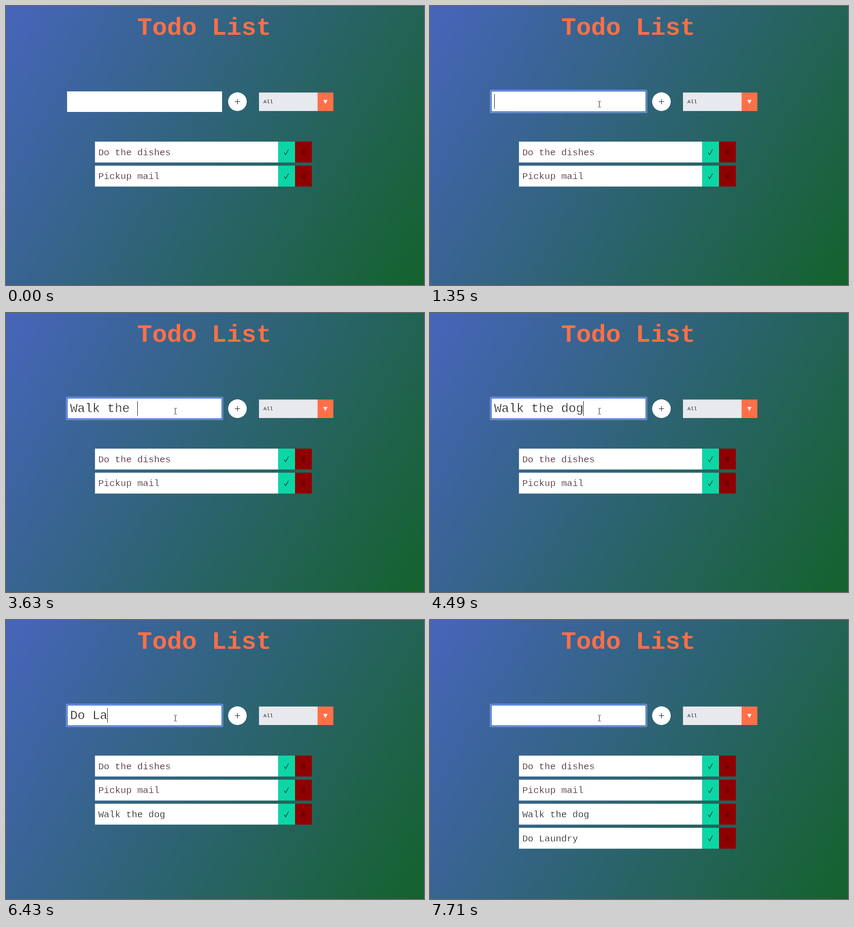
An HTML page for the animation above (8000 ms loop, 917 px wide and 611 px high).

```html
<!DOCTYPE html>
<html lang="en">
<head>
<meta charset="utf-8">
<title>Todo List</title>
<style>
  html, body { margin: 0; width: 100%; height: 100%; overflow: hidden; }
  body { background: linear-gradient(120deg, #4765bb, #14622c); }
  svg { display: block; width: 917px; height: 611px; }
  text { font-family: "Courier New", "Liberation Mono", monospace; fill: #1c1a1c; white-space: pre; }
  .title { font-size: 54.4px; font-weight: bold; fill: #ff6f47; }
  .typed { font-size: 27.2px; stroke: #fff; stroke-width: .6; }
  .item { font-size: 20.4px; stroke: #fff; stroke-width: .4; }
  .old { fill: #3e1a22; }
  .small { font-size: 11.6px; }
  .line { fill: none; stroke: #161616; }
</style>
</head>
<body>
<svg viewBox="0 0 917 611">
  <defs>
    <g id="row">
      <rect width="402" height="45.7" fill="#fff"/>
      <rect x="402" width="37" height="45.7" fill="#0cd6a6"/>
      <rect x="439" width="36.7" height="45.7" fill="#8f0000"/>
      <path class="line" stroke-width="1.1" d="M415.3 24l3 4.7 6.3-11.5"/>
      <path fill="none" stroke="#560004" d="M453 18.5h8M454.5 19v9h5.5v-9M456.3 20v7M458.2 20v7"/>
    </g>
  </defs>

  <text class="title" x="288.1" y="63">Todo List</text>

  <rect x="134" y="187" width="340" height="45" fill="#fff"/>
  <g id="ring">
    <rect x="132" y="184" width="344" height="50" rx="2" fill="#fff" opacity=".8"/>
    <rect x="133" y="185" width="342" height="48" rx="1" fill="#1a54d2"/>
    <rect x="135" y="187" width="338" height="44" fill="#fff"/>
  </g>
  <text id="typed" class="typed" x="140.8" y="217"></text>
  <rect id="caret" y="193" width="1" height="32" fill="#111"/>

  <circle cx="507.7" cy="209.5" r="20.4" fill="#fff"/>
  <path class="line" stroke-width="1.1" d="M502 209.5h11.5M507.7 203.8v11.5"/>

  <rect x="555" y="189.5" width="129" height="40.5" fill="#e7e9ed"/>
  <rect x="683.5" y="189.5" width="34.7" height="40.5" fill="#ff7048"/>
  <path d="M696 205.8h9.4l-4.7 8.8z" fill="#fff"/>
  <text class="small" x="564.8" y="213">All</text>

  <g id="list"></g>

  <path id="arrow" d="M0 0v16l3.7-3.5 2.5 5.8 2.6-1.1-2.5-5.7h5.2z" fill="#fff" stroke="#111"/>
  <path id="beam" class="line" d="M-3-6.5H-1L0-5.5 1-6.5H3M0-6V6M-3 6.5H-1L0 5.5 1 6.5H3"/>
</svg>
<script>
const LOOP = 8000, FOCUS = 1290, BLINK = 520, PITCH = 16.3;
const $ = id => document.getElementById(id);

const items = [
  { label: "Do the dishes", time: 0 },
  { label: "Pickup mail", time: 0 },
  { label: "Walk the dog", time: 4750 },
  { label: "Do Laundry", time: 7510 }
];

// each burst is typed at an even pace (ms per key)
const bursts = [
  { text: "Walk", start: 2340, pace: 190 },
  { text: " the ", start: 3160, pace: 117 },
  { text: "dog", start: 3890, pace: 265 },
  { text: "Do ", start: 5500, pace: 200 },
  { text: "L", start: 6100, pace: 200 },
  { text: "aundry", start: 6430, pace: 150 }
];

const rows = items.map(({ label, time }, i) => {
  const g = document.createElementNS("http://www.w3.org/2000/svg", "g");
  g.setAttribute("transform", `translate(195.2 ${297 + i * 52.7})`);
  g.innerHTML = `<use href="#row"/><text class="item${time ? "" : " old"}" x="7.2" y="29.5">${label}</text>`;
  $("list").append(g);
  return { g, time };
});

const show = (el, on) => el.style.display = on ? "" : "none";
const clamp = v => Math.max(0, Math.min(1, v));
const easeOut = v => 1 - (1 - v) ** 3;

function typing(t) {
  const cleared = Math.max(...items.map(i => i.time).filter(time => time <= t));
  let text = "", lastKey = FOCUS;
  for (const b of bursts.filter(b => b.start <= t)) {
    const n = Math.min(b.text.length, Math.floor((t - b.start) / b.pace) + 1);
    lastKey = b.start + (n - 1) * b.pace;
    if (b.start >= cleared) text += b.text.slice(0, n);
  }
  return { text, lastKey };
}

// a fast sweep into the input, then a small curved drift; moves in 68 ms ticks
function pointer(t) {
  const now = 470 + Math.floor((t - 470) / 68) * 68;
  const sweep = easeOut(clamp((now - 470) / 480));
  const drift = clamp((now - 950) / 260);
  const bow = Math.sin(Math.PI * drift);
  return {
    x: Math.round(727 - 361 * sweep + 5 * drift - 6 * bow),
    y: Math.round(540 - 317 * sweep - 8 * drift - 6 * bow)
  };
}

function place(el, on, x, y) {
  show(el, on);
  el.setAttribute("transform", `translate(${x + 0.5} ${y})`);
}

function render(t) {
  rows.forEach(r => show(r.g, t >= r.time));

  const { text, lastKey } = typing(t);
  $("typed").textContent = text;
  $("caret").setAttribute("x", Math.floor(141.35 + text.length * PITCH));
  show($("caret"), t >= FOCUS && Math.floor((t - lastKey) / BLINK) % 2 === 0);
  $("ring").style.opacity = t < FOCUS ? 0 : clamp(0.5 + (t - FOCUS) / 120);

  const { x, y } = pointer(t);
  const inInput = x >= 134 && x < 474 && y >= 187 && y < 232;
  place($("beam"), t >= 470 && inInput, x, y);
  place($("arrow"), t >= 470 && !inInput, x, y);
}

const start = performance.now();
function tick() {
  render((performance.now() - start) % LOOP);
  requestAnimationFrame(tick);
}
tick();
</script>
</body>
</html>
```
